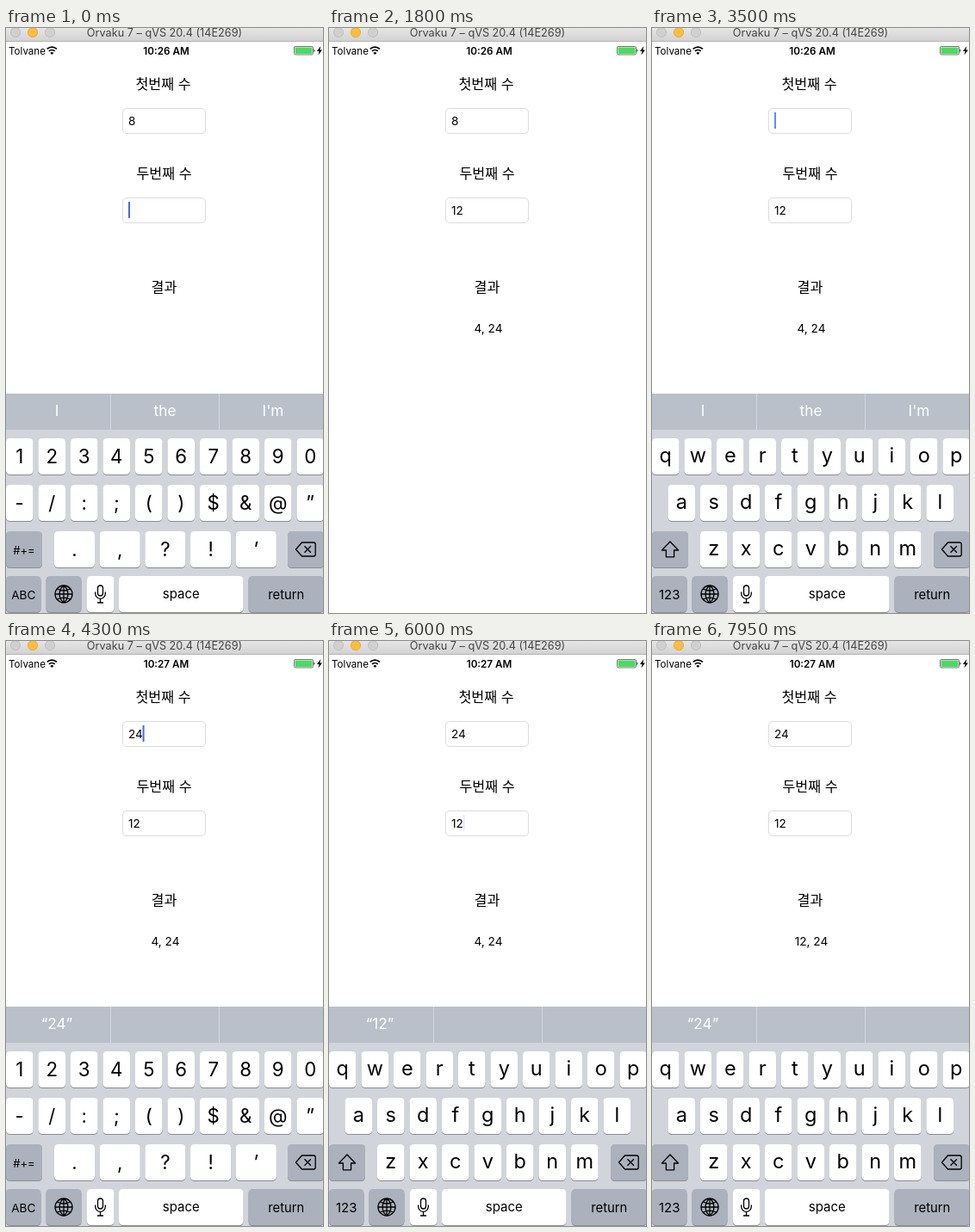
An HTML page that plays this animation: 368x680 px, repeating every 8000 ms.

```html
<!DOCTYPE html>
<html lang="ko">
<head>
<meta charset="utf-8">
<style>
  html, body { margin: 0; width: 100%; height: 100%; overflow: hidden; background: #fff; }
  svg { display: block; font-family: Inter, Roboto, sans-serif; }
  .label { font: 16.2px "Noto Sans CJK KR", "Noto Sans CJK", sans-serif; }
  .mid { text-anchor: middle; }
  .icon { fill: none; stroke: #000; stroke-width: 1.3; stroke-linejoin: round; }
  .hint { fill: #fff; font-size: 17.2px; text-anchor: middle; }
</style>
</head>
<body>
<svg width="368" height="680" viewBox="0 0 368 680">
  <defs>
    <linearGradient id="chrome" x2="0" y2="1">
      <stop stop-color="#e6e6e6"/><stop offset="1" stop-color="#d2d2d2"/>
    </linearGradient>
  </defs>
  <rect width="368" height="680" fill="#fff"/>

  <rect width="368" height="15" fill="url(#chrome)"/>
  <rect y="15" width="368" height="1" fill="#b4b4b4"/>
  <g stroke-width=".8">
    <circle cx="11" cy="5" r="5.6" fill="#d0d0d0" stroke="#b9b9b9"/>
    <circle cx="31" cy="5" r="5.6" fill="#fdbd3e" stroke="#e2a035"/>
    <circle cx="51" cy="5" r="5.6" fill="#d0d0d0" stroke="#b9b9b9"/>
  </g>
  <text class="mid" x="184" y="10" font-size="12.7" fill="#444">Orvaku 7 – qVS 20.4 (14E269)</text>

  <text x="3" y="30.5" font-size="11.6">Tolvane</text>
  <g fill="none" stroke="#000" stroke-width="1.7">
    <path d="M47.7 24.4a8 8 0 0 1 11.2 0M49.9 26.9a4.9 4.9 0 0 1 6.8 0"/>
    <path d="M53.3 31l-2-2.1a2.9 2.9 0 0 1 4 0z" fill="#000" stroke="none"/>
  </g>
  <text class="mid" id="clock" x="186" y="30.5" font-size="11.7" font-weight="600"></text>
  <rect x="334.5" y="21.5" width="22" height="9.5" rx="1.6" fill="#fff" stroke="#555" stroke-width=".8"/>
  <rect x="335.5" y="22.5" width="20" height="7.5" rx=".8" fill="#4cd964"/>
  <path d="M357.5 24.5q2 1.7 0 3.5z"/>
  <path d="M365.4 21l-4.4 6h2.6l-1.2 4.6 4.6-6h-2.7z"/>

  <text class="label mid" x="182.5" y="71">첫번째 수</text>
  <text class="label mid" x="183.5" y="175">두번째 수</text>
  <text class="label mid" x="183.5" y="307">결과</text>
  <g fill="#fff" stroke="#dcdcdc">
    <rect x="135.5" y="93.5" width="96" height="29" rx="4.5"/>
    <rect x="135.5" y="197.5" width="96" height="29" rx="4.5"/>
  </g>
  <g font-size="13.6">
    <text id="first" x="142" y="112.5"></text>
    <text id="second" x="142" y="216.5"></text>
    <text class="mid" id="result" x="185" y="353.5"></text>
  </g>
  <rect id="caret" width="2" height="19" fill="#4669ea"/>

  <g id="keyboard">
    <rect y="425" width="368" height="255" fill="#d1d5db"/>
    <rect y="425" width="368" height="42" fill="#b9c0c9"/>
    <path d="M121.5 425v42M247.5 425v42" stroke="#d3d7dc"/>
    <text class="hint" id="hint0" x="59" y="450.5"></text>
    <text class="hint" id="hint1" x="184.5" y="450.5"></text>
    <text class="hint" id="hint2" x="310" y="450.5"></text>
    <text class="hint" id="oldHint" x="59" y="450.5"></text>
    <g id="letters"></g>
    <g id="numbers"></g>
    <g id="common"></g>
    <g class="icon">
      <path d="M336.5 606l7-8h13.5q2.2 0 2.2 2.2v11.6q0 2.2-2.2 2.2h-13.5zM346.5 602.3l7.4 7.4m0-7.4l-7.4 7.4"/>
      <path d="M57 658a10 10 0 1 0 20 0a10 10 0 1 0-20 0h20M67 648v20M67 648c-6.5 5-6.5 15 0 20c6.5-5 6.5-15 0-20M59.3 652q7.7 3.6 15.4 0M59.3 664q7.7-3.6 15.4 0"/>
      <rect x="106.5" y="648" width="6" height="12" rx="3"/>
      <path d="M103.7 655.5v2a5.8 5.8 0 0 0 11.6 0v-2M109.5 663.5v4.3M106 668h7"/>
    </g>
  </g>
</svg>
<script>
const LOOP = 8000, STEP = 50, KEYBOARD_HEIGHT = 255;
const el = Object.fromEntries([...document.querySelectorAll('[id]')].map(e => [e.id, e]));
const clamp = v => Math.max(0, Math.min(1, v));

function addKey(group, x, y, width, text, size, { gray = false, baseline = 29 } = {}) {
  group.insertAdjacentHTML('beforeend',
    `<rect x="${x}" y="${y + 1}" width="${width}" height="42" rx="4.5" fill="#898d94"/>
     <rect x="${x}" y="${y}" width="${width}" height="42" rx="4.5" fill="${gray ? '#abb1bd' : '#fff'}"/>
     <text class="mid" x="${x + width / 2}" y="${y + baseline}" font-size="${size}">${text.replace('&', '&amp;')}</text>`);
}

function addRow(group, keys, x, y, { pitch = 37.5, width = 31.5, size = 22.3, baseline = 29 } = {}) {
  [...keys].forEach((key, i) => addKey(group, x + pitch * i, y, width, key, size, { baseline }));
}

const gray = { gray: true, baseline: 26.5 };
const lower = { size: 23.5, baseline: 27.5 };

addRow(el.letters, 'qwertyuiop', 0, 477, lower);
addRow(el.letters, 'asdfghjkl', 18.5, 531, lower);
addRow(el.letters, 'zxcvbnm', 56, 585, lower);
addKey(el.letters, 0, 585, 42, '', 13, gray);
addKey(el.letters, 0, 637, 40.5, '123', 15, gray);
el.letters.insertAdjacentHTML('beforeend',
  '<path class="icon" d="M21 597l9.6 10h-5v7.8h-9.2v-7.8h-5z"/>');

addRow(el.numbers, '1234567890', 0, 477);
addRow(el.numbers, '-/:;()$&@”', 0, 531);
addRow(el.numbers, '.,?!’', 56, 585, { pitch: 52.7, width: 47 });
addKey(el.numbers, 0, 585, 42, '#+=', 13, gray);
addKey(el.numbers, 0, 637, 40.5, 'ABC', 13.6, gray);

addKey(el.common, 327, 585, 42, '', 13, gray);
addKey(el.common, 46.5, 637, 41, '', 13, gray);
addKey(el.common, 94, 637, 31.5, '', 13);
addKey(el.common, 131, 637, 144.5, 'space', 15, { baseline: 26 });
addKey(el.common, 281.5, 637, 87.5, 'return', 14.8, gray);

// Each entry changes part of the state from its time on.
const timeline = [
  [0, { first: '8', second: '', result: '', clock: '10:26 AM', field: 'second',
        numeric: true, open: true, moved: -2000, rate: 24, blink: 430 }],
  [250, { second: '1' }],
  [650, { second: '12' }],
  [1400, { result: '4, 24', open: false, moved: 1430 }],
  [2750, { field: 'first', numeric: false, open: true, moved: 2715, rate: 30, blink: 3020 }],
  [3150, { first: '' }],
  [3650, { numeric: true, blink: 4400 }],
  [3900, { first: '2' }],
  [4000, { clock: '10:27 AM' }],
  [4250, { first: '24' }],
  [4850, { field: 'second', numeric: false, blink: 4820 }],
  [6150, { result: '12, 24', open: false, moved: 6130, rate: 120 }],
  [7450, { field: 'first', open: true, moved: 7420, rate: 25, blink: 7350 }],
];
const HINT_FADE = { start: 4830, end: 4970, text: '“24”' };

function stateAt(t) {
  return Object.assign({}, ...timeline.filter(([time]) => time <= t).map(([, change]) => change));
}

// Solid for 450 ms, then fades out and in with pauses of 150 ms.
function caretOpacity(age) {
  if (age < 450) return 1;
  const phase = (age - 450) % 600 / 150;
  return phase < 2 ? clamp(1 - phase) : clamp(phase - 2);
}

function keyboardOffset({ open, moved, rate }, t) {
  const x = Math.max(0, t - moved) / 1000 * rate;
  const remaining = (1 + x) * Math.exp(-x);
  return KEYBOARD_HEIGHT * (open ? remaining : 1 - remaining);
}

function draw(t) {
  const s = stateAt(t);
  for (const id of ['first', 'second', 'result', 'clock']) el[id].textContent = s[id];

  const typed = s[s.field];
  const caretX = typed ? 141.7 + el[s.field].getComputedTextLength() : 142;
  el.caret.setAttribute('x', caretX);
  el.caret.setAttribute('y', s.field === 'first' ? 98 : 202);
  el.caret.setAttribute('opacity', s.open ? caretOpacity(t - s.blink) : 0);

  const hints = typed ? [`“${typed}”`, '', ''] : ['I', 'the', "I'm"];
  hints.forEach((hint, i) => el['hint' + i].textContent = hint);
  const fade = t < HINT_FADE.start ? 1 : clamp((t - HINT_FADE.start) / (HINT_FADE.end - HINT_FADE.start));
  el.hint0.setAttribute('opacity', fade);
  el.oldHint.textContent = fade < 1 ? HINT_FADE.text : '';
  el.oldHint.setAttribute('opacity', 1 - fade);

  el.letters.setAttribute('display', s.numeric ? 'none' : 'inline');
  el.numbers.setAttribute('display', s.numeric ? 'inline' : 'none');
  const offset = keyboardOffset(s, t);
  el.keyboard.setAttribute('transform', `translate(0 ${offset.toFixed(2)})`);
  el.keyboard.setAttribute('display', offset > KEYBOARD_HEIGHT - 1 ? 'none' : 'inline');
}

const startTime = performance.now();
function tick() {
  const t = (performance.now() - startTime) % LOOP;
  draw(Math.floor(t / STEP) * STEP);
  requestAnimationFrame(tick);
}
tick();
</script>
</body>
</html>
```
